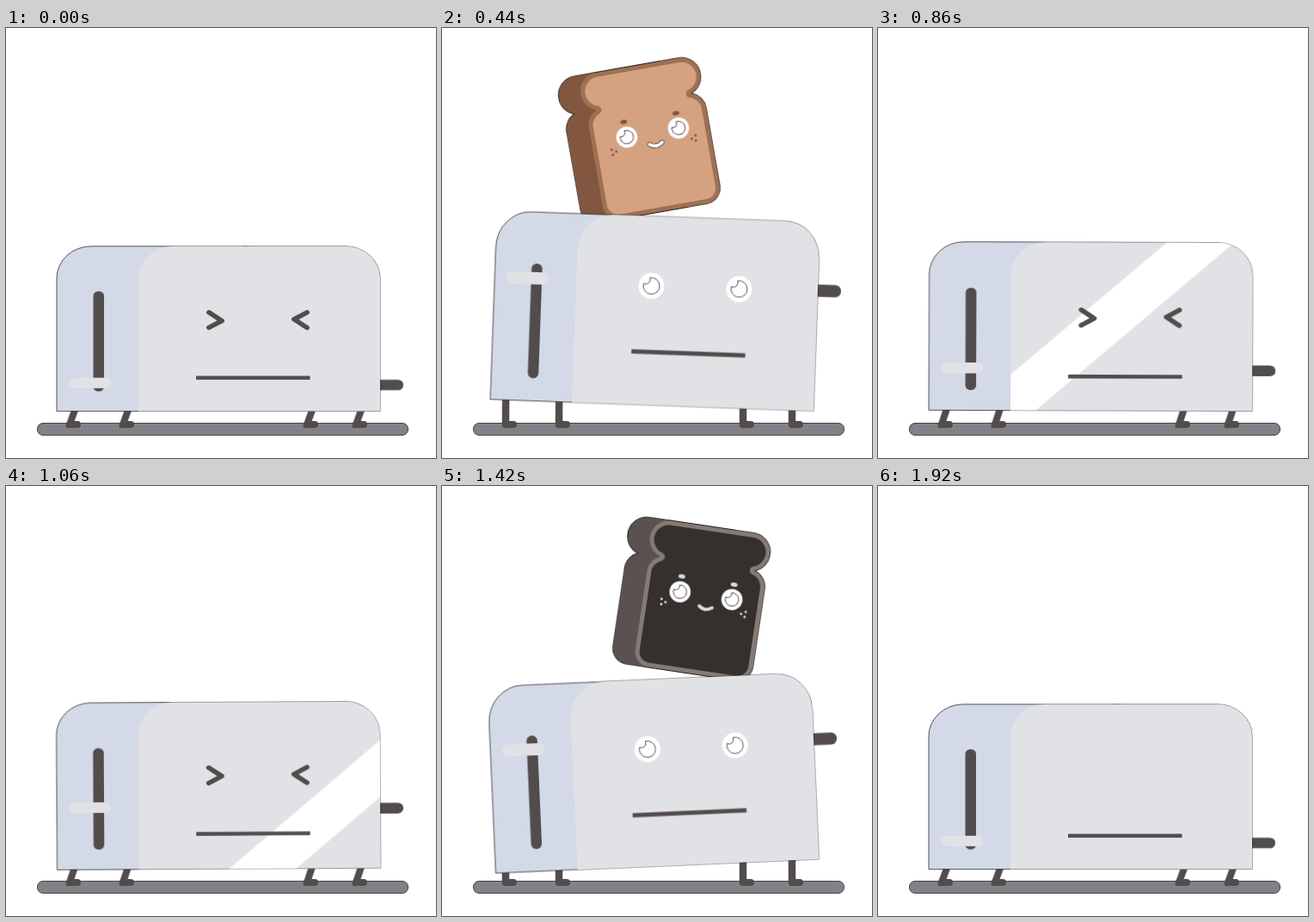
An HTML page for the animation above (1.94 s loop, 500 by 500 pixels).

```html
<!DOCTYPE html>
<html lang="en">
<head>
<meta charset="utf-8">
<title>Toaster</title>
<style>
  html, body { margin: 0; width: 100%; height: 100%; overflow: hidden; background: #fff; }
  svg { display: block; width: 100%; height: 100%; }

  .anim { animation: 1940ms ease-in-out infinite; }
  .body { animation-name: body; transform-origin: 247px 445px; }
  .lever { animation-name: lever; }
  .face { animation-name: face; }
  .shine { animation-name: shine; animation-timing-function: linear; }
  .leg { animation-name: leg; }
  .open { animation-name: open; animation-timing-function: step-end; }
  .shut { animation-name: shut; animation-timing-function: step-end; }
  .toast { --up: cubic-bezier(.33, 1, .67, 1); --down: cubic-bezier(.33, 0, .67, .33); }
  .fresh { animation-name: fresh; --side: #835640; --crust: #a07052; --crumb: #d4a281; --mark: #835640; --smile: #fff; --lip: #222; }
  .burnt { animation-name: burnt; --side: #5b5150; --crust: #847a76; --crumb: #35302d; --mark: #dcdad9; --smile: #dcdad9; --lip: none; }

  .dark { fill: #524c4c; }
  .line { fill: none; stroke: #524c4c; stroke-linecap: round; stroke-linejoin: round; }
  .edge { stroke: #111; stroke-width: .7; vector-effect: non-scaling-stroke; }

  /* squash, stretch and tilt of the whole toaster, once for each slice */
  @keyframes body {
    0%, 1% { transform: translate(0, .6px) rotate(0deg) scaleY(.884); animation-timing-function: ease-in; }
    13.4% { transform: translate(-3px, -4.5px) rotate(1.4deg) scaleY(.95); animation-timing-function: ease-out; }
    24.7% { transform: translate(-3px, -6.5px) rotate(2.1deg) scaleY(1.015); animation-timing-function: ease-in; }
    31.96% { transform: translate(-3px, -6px) rotate(1.9deg) scaleY(1); animation-timing-function: linear; }
    44.33% { transform: translate(0, 0) rotate(.2deg) scaleY(.903); animation-timing-function: ease-out; }
    48%, 51% { transform: translate(0, .6px) rotate(0deg) scaleY(.884); animation-timing-function: ease-in; }
    62.89% { transform: translate(3.3px, -1.5px) rotate(-2.3deg) scaleY(.956); animation-timing-function: ease-out; }
    73% { transform: translate(3.3px, -3px) rotate(-2.5deg) scaleY(1); animation-timing-function: ease-in; }
    83.51% { transform: translate(2.7px, -2.5px) rotate(-2deg) scaleY(.968); animation-timing-function: linear; }
    93.3% { transform: translate(0, 0) rotate(-.2deg) scaleY(.903); animation-timing-function: ease-out; }
    98%, 100% { transform: translate(0, .6px) rotate(0deg) scaleY(.884); }
  }
  @keyframes lever {
    0%, 2% { transform: translateY(0); animation-timing-function: ease-out; }
    13.4% { transform: translateY(-99px); animation-timing-function: ease-out; }
    22.7% { transform: translateY(-104px); animation-timing-function: ease-in; }
    31.96% { transform: translateY(-101.5px); animation-timing-function: linear; }
    44.33% { transform: translateY(-18px); animation-timing-function: ease-out; }
    48%, 51.5% { transform: translateY(0); animation-timing-function: ease-out; }
    62.89% { transform: translateY(-103.7px); animation-timing-function: ease-out; }
    71% { transform: translateY(-106px); animation-timing-function: ease-in; }
    83.51% { transform: translateY(-84.5px); animation-timing-function: linear; }
    93.3% { transform: translateY(-18px); animation-timing-function: ease-out; }
    98%, 100% { transform: translateY(0); }
  }
  @keyframes face {
    0%, 2% { transform: translateY(0); animation-timing-function: ease-in; }
    13.4% { transform: translateY(-10px); animation-timing-function: ease-out; }
    22.7% { transform: translateY(-17px); animation-timing-function: ease-in; }
    31.96% { transform: translateY(-11.6px); animation-timing-function: ease-out; }
    41%, 51.5% { transform: translateY(0); animation-timing-function: ease-in; }
    62.89% { transform: translateY(-15px); animation-timing-function: ease-out; }
    71% { transform: translateY(-17px); animation-timing-function: ease-in; }
    83.51% { transform: translateY(-3.5px); animation-timing-function: ease-out; }
    90%, 100% { transform: translateY(0); }
  }
  @keyframes shine {
    0% { transform: translateX(-660px); }
    100% { transform: translateX(832px); }
  }
  @keyframes leg {
    0%, 1% { transform: skewX(-20deg); animation-timing-function: ease-in; }
    13.4% { transform: skewX(-6deg); animation-timing-function: ease-out; }
    24.7%, 31.96% { transform: skewX(0deg); animation-timing-function: linear; }
    44.33% { transform: skewX(-18deg); animation-timing-function: ease-out; }
    48%, 51% { transform: skewX(-20deg); animation-timing-function: ease-in; }
    62.89% { transform: skewX(-8deg); animation-timing-function: ease-out; }
    73% { transform: skewX(0deg); animation-timing-function: ease-in; }
    83.51% { transform: skewX(-4deg); animation-timing-function: linear; }
    93.3% { transform: skewX(-18deg); animation-timing-function: ease-out; }
    98%, 100% { transform: skewX(-20deg); }
  }
  @keyframes open {
    0% { visibility: hidden; }
    14.9% { visibility: visible; }
    40.2% { visibility: hidden; }
    61.9% { visibility: visible; }
    88.66% { visibility: hidden; }
    100% { visibility: hidden; }
  }
  @keyframes shut {
    0% { visibility: visible; }
    14.9% { visibility: hidden; }
    40.2% { visibility: visible; }
    61.9% { visibility: hidden; }
    88.66% { visibility: visible; }
    98.5% { visibility: hidden; }
    100% { visibility: hidden; }
  }
  /* each slice is thrown up, hangs and drops back */
  @keyframes fresh {
    0%, 3.09% { transform: translateY(186px); animation-timing-function: var(--up); }
    23.71% { transform: translateY(-34px); animation-timing-function: var(--down); }
    44.33%, 100% { transform: translateY(186px); }
  }
  @keyframes burnt {
    0%, 54.38% { transform: translateY(186px); animation-timing-function: var(--up); }
    75% { transform: translateY(-34px); animation-timing-function: var(--down); }
    95.62%, 100% { transform: translateY(186px); }
  }
</style>
</head>
<body>
<svg viewBox="0 0 500 500">
  <defs>
    <path id="slice" d="M-48-80H48A22 22 0 0 1 55-37A20 20 0 0 1 70-16V74A18 18 0 0 1 52 92H-50A18 18 0 0 1-68 74V-16A20 20 0 0 1-55-37A22 22 0 0 1-48-80Z"/>
    <clipPath id="sliceClip"><use href="#slice"/></clipPath>
    <path id="front" d="M154 445V270A40 42 0 0 1 194 228H395A40 42 0 0 1 435 270V445Z"/>
    <clipPath id="frontClip"><use href="#front"/></clipPath>
    <clipPath id="slotClip"><rect width="500" height="425"/></clipPath>

    <g id="eye">
      <circle r="15" fill="#fff"/>
      <path class="edge" fill="#fff" d="M-2-9.3A9.5 9.5 0 1 1-9.2-2.4A5.3 5.3 0 0 0-2-9.3Z"/>
    </g>

    <g id="freckles" fill="var(--mark)">
      <circle cx="-2.5" cy="-3" r="1.4"/>
      <circle cx="2.5" r="1.4"/>
      <circle cx="-2" cy="3" r="1.4"/>
    </g>

    <g id="toast">
      <g stroke="#111" stroke-width="1.4">
        <use href="#slice" x="-26"/>
        <use href="#slice"/>
      </g>
      <use href="#slice" x="-26" fill="var(--side)"/>
      <g clip-path="url(#sliceClip)">
        <use href="#slice" fill="var(--crumb)" stroke="var(--crust)" stroke-width="10" stroke-linejoin="round"/>
      </g>
      <ellipse cx="-27" cy="-18" rx="4" ry="2.5" fill="var(--mark)"/>
      <ellipse cx="34.5" cy="-17.5" rx="4" ry="2.5" fill="var(--mark)"/>
      <use href="#eye" transform="translate(-26.5 0) scale(.82)"/>
      <use href="#eye" transform="translate(34.5 0) scale(.82)"/>
      <g fill="none" stroke-linecap="round">
        <path d="M-2 13Q5 19 13 13" stroke="var(--lip)" stroke-width="5"/>
        <path d="M-2 13Q5 19 13 13" stroke="var(--smile)" stroke-width="3.8"/>
      </g>
      <use href="#freckles" x="-44" y="14.5"/>
      <use href="#freckles" transform="translate(50 15) scale(-1 1)"/>
    </g>

    <path id="foot" class="line" stroke-width="8" d="M0 0H9"/>
  </defs>

  <rect class="edge" x="36.5" y="459.5" width="431" height="14" rx="6.5" fill="#818187"/>
  <g transform="translate(74 461)"><path class="line anim leg" stroke-width="8.5" d="M0-38V0"/><use href="#foot"/></g>
  <g transform="translate(136 461)"><path class="line anim leg" stroke-width="8.5" d="M0-38V0"/><use href="#foot"/></g>
  <g transform="translate(350 461)"><path class="line anim leg" stroke-width="8.5" d="M0-38V0"/><use href="#foot"/></g>
  <g transform="translate(407 461)"><path class="line anim leg" stroke-width="8.5" d="M0-38V0"/><use href="#foot"/></g>

  <g clip-path="url(#slotClip)">
    <g class="anim toast fresh"><use href="#toast" transform="translate(241 156) rotate(-10)"/></g>
    <g class="anim toast burnt"><use href="#toast" transform="translate(303 160) rotate(8.5)"/></g>
  </g>

  <g class="anim body">
    <rect class="dark anim lever" x="420" y="403.5" width="42" height="14" rx="6.5"/>
    <path class="edge" fill="#d3d9e7" d="M59 445V270A40 42 0 0 1 99 228H395A40 42 0 0 1 435 270V445Z"/>
    <use href="#front" fill="#e1e2e6"/>
    <g clip-path="url(#frontClip)">
      <path class="anim shine" fill="#fff" d="M333 228H411L181 445H103Z"/>
    </g>

    <rect class="dark" x="101.5" y="287" width="12.5" height="132" rx="6.2"/>
    <rect class="anim lever" x="73" y="401" width="49" height="14" rx="6.5" fill="#e1e2e6"/>

    <g class="anim face">
      <rect class="dark" x="221" y="398.5" width="132.5" height="5"/>
      <g class="anim shut">
        <path class="line" stroke-width="6" d="M236 315L251 326L236 335"/>
        <path class="line" stroke-width="6" d="M350 315L335 324L350 335"/>
      </g>
      <g class="anim open">
        <use href="#eye" x="241.5" y="325"/>
        <use href="#eye" x="343.5" y="325"/>
      </g>
    </g>
  </g>
</svg>
</body>
</html>
```
